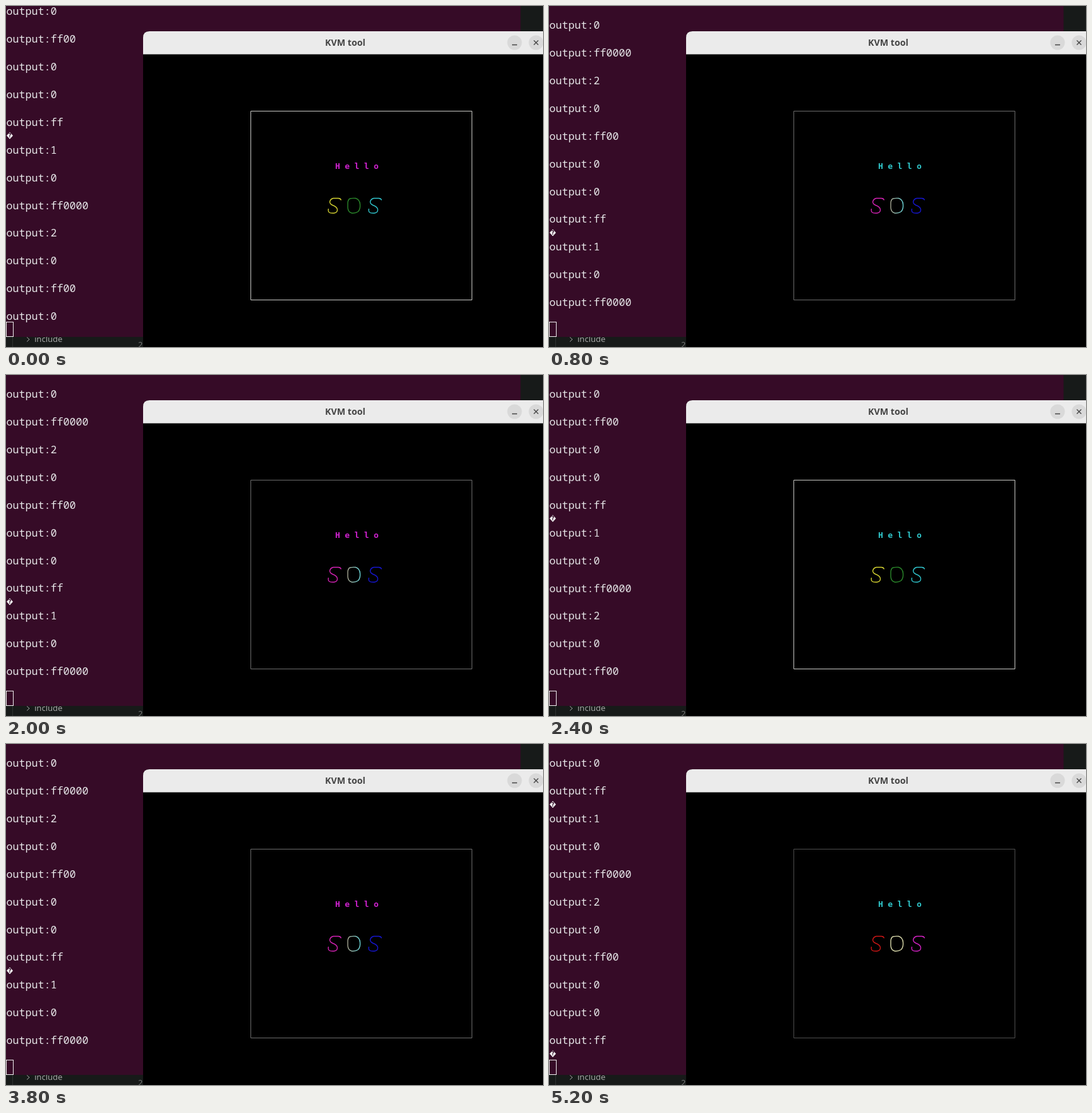
Write an HTML page that moves like this. It is 850 px wide and 540 px high and loops after 5.4 s.

```html
<!DOCTYPE html>
<html lang="en">
<head>
<meta charset="utf-8">
<title>KVM tool</title>
<style>
  html, body { margin: 0; width: 100%; height: 100%; overflow: hidden; background: #000; }
  svg { display: block; width: 850px; height: 540px; }
  .log text { font: 16.67px "Noto Sans Mono", "DejaVu Sans Mono", monospace; fill: #e6e6e8; }
  .log .mark { font: bold 8px "DejaVu Sans", sans-serif; fill: #300a24; text-anchor: middle; }
  .ui { font: 13px "Noto Sans", "Open Sans", sans-serif; fill: #a4a4a4; }
  .title { font: bold 14.2px "Noto Sans", "Open Sans", sans-serif; fill: #444; text-anchor: middle; }
  .hello { font: bold 13px "DejaVu Sans Mono", monospace; letter-spacing: 7.4px;
    animation: hello 5400ms step-end infinite; }
  .pen { fill: none; stroke-width: 1.4; stroke-linejoin: round; }

  /* three states, 200 ms each */
  .state { opacity: 0; animation: turn 600ms step-end infinite; }
  .state1 { animation-delay: -400ms; }
  .state2 { animation-delay: -200ms; }
  .state0 .log { animation: scroll 5400ms step-end infinite; }
  .extra { animation: extra 5400ms step-end infinite; }

  @keyframes turn { 0% { opacity: 1; } 33.333%, 100% { opacity: 0; } }
  @keyframes scroll { 0% { transform: translateY(-21.93px); } 3.703%, 100% { transform: none; } }
  @keyframes extra { 0% { opacity: 1; } 3.703%, 100% { opacity: 0; } }
  @keyframes hello {
    0%, 25.925%, 62.962% { fill: #d022d0; }
    7.407%, 44.444%, 81.481%, 100% { fill: #30c8cc; }
  }
</style>
</head>
<body>
<svg viewBox="0 0 850 540">
  <defs>
    <linearGradient id="pale">
      <stop offset="0" stop-color="#a4a490"/>
      <stop offset="1" stop-color="#6cd4d8"/>
    </linearGradient>
    <path id="S" d="M21.500 4 Q20.500 1 17 1 H9 Q4.500 2 3.500 6.500 Q3.500 10 8 12 Q15 14.500 15.500 19 Q15.500 24 10 24.500 Q3 25 1.500 22 Q0.500 20 1.500 17.500"/>
    <path id="O" d="M5 1.500 Q9 0.500 14 1 Q20.500 3 21 11 Q21.500 18 18 22 Q14 25 8 24.500 Q2 23 1.500 16 V8 Q2 3 5 1.500"/>
  </defs>

  <!-- editor behind the terminal -->
  <rect width="850" height="540" fill="#171a19"/>
  <path d="M10.500 524 V540" stroke="#303232"/>
  <path d="M33 524.500 l4 3.500 -4 3.500" fill="none" stroke="#a4a4a4"/>
  <text class="ui" x="45" y="532">include</text>
  <text class="ui" x="209" y="541" style="fill:#757575">2</text>

  <rect width="814.500" height="524" fill="#360b27"/>
  <rect x=".5" y="500.500" width="11" height="23" fill="none" stroke="#f0f0f0"/>

  <!-- window -->
  <path d="M217 540 V50 Q217 40 227 40 H850 V540 Z" fill="#000"/>
  <path d="M217 76.500 V50 Q217 40 227 40 H850 V76.500 Z" fill="#ebebeb"/>
  <text class="title" x="537" y="63">KVM tool</text>
  <g fill="#d9d9d9">
    <circle cx="805" cy="58" r="11.500"/>
    <circle cx="839" cy="58" r="11.500"/>
  </g>
  <path d="M801 61.500 h8 M835.500 54.500 l7 7 m0 -7 l-7 7" stroke="#444" stroke-width="1.400"/>
  <text class="hello" x="521" y="258">Hello</text>
  <g id="states"></g>
</svg>

<script>
  const cycle = ["0", "ff00", "0", "0", "ff", "1", "0", "ff0000", "2"];
  // frame, first S, O, second S
  const palettes = [
    ["#cacac6", "#d2d030", "#2a862a", "#30c4cc"],
    ["#6c6c6c", "#d422b4", "url(#pale)", "#1616d0"],
    ["#4e4e4e", "#cc1616", "#d6d6a8", "#d422c4"]
  ];
  const ROWS = 11;
  const lineY = n => 14.5 + 21.93 * n;

  const output = (value, n, cls = "") =>
    `<text class="${cls}" x=".5" y="${lineY(n)}">output:${value}</text>`;

  const badChar = n => {
    const y = lineY(n) - 6.5;
    return `<path d="M6 ${y - 5.5} l5 5.500 -5 5.500 -5 -5.500 z" fill="#f4f4f4"/>
      <text class="mark" x="6" y="${y + 3}">?</text>`;
  };

  function logLines(state) {
    const start = (9 - 3 * state) % 9;
    let out = "";
    for (let i = 0; i < ROWS; i++) {
      const value = cycle[(start + i) % 9];
      const n = 1 + 2 * i;
      out += output(value, n);
      if (value === "ff") out += badChar(n + 1);
    }
    return state === 0 ? out + output("0", 23, "extra") : out;
  }

  const glyph = (id, x, color) =>
    `<use href="#${id}" x="${x}" y="303.500" stroke="${color}"/>`;

  document.getElementById("states").innerHTML = palettes.map(([frame, a, b, c], i) => `
    <g class="state state${i}">
      <g class="log">${logLines(i)}</g>
      <g class="pen">
        <rect x="387.500" y="166.500" width="350" height="299" stroke="${frame}" stroke-width="1"/>
        ${glyph("S", 509, a)}${glyph("O", 539.5, b)}${glyph("S", 573, c)}
      </g>
    </g>`).join("");
</script>
</body>
</html>
```
